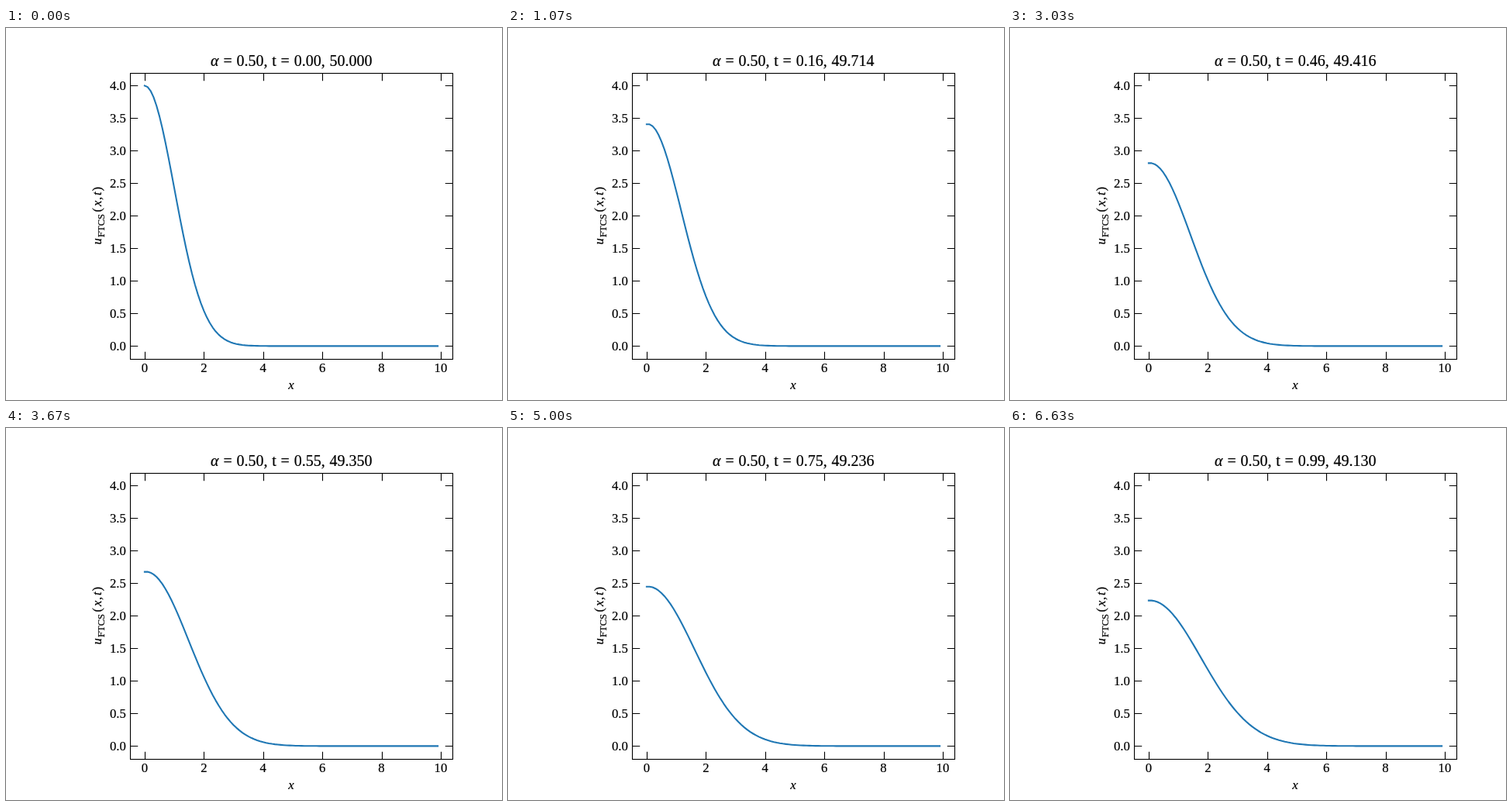
Animation, 640 px wide and 480 px high, one loop 6.66 s. Source, as an HTML page:

```html
<!DOCTYPE html>
<html lang="en">
<head>
<meta charset="utf-8">
<title>Heat equation, FTCS scheme</title>
<style>
  html, body { margin: 0; width: 100%; height: 100%; overflow: hidden; background: #fff; }
  svg { display: block; width: 640px; height: 480px; }
  text { font: 16.67px "Liberation Serif", "Times New Roman", serif; stroke: #000; stroke-width: .2px; }
  .title { font-size: 20px; word-spacing: .8px; }
  .var { font-style: italic; }
  .sub { font-size: 12.6px; }
  .frame { fill: none; stroke: #000; stroke-width: 1.11; }
  .curve { fill: none; stroke: #1f77b4; stroke-width: 2.083; stroke-linecap: square; stroke-linejoin: round; }
</style>
</head>
<body>
<svg viewBox="0 0 640 480">
  <path class="curve" id="curve"/>
  <path class="frame" id="ticks"/>
  <rect class="frame" x="160.5" y="58.5" width="416" height="369"/>
  <g id="labels"></g>
  <text class="title" x="368.3" y="48.7" text-anchor="middle"><tspan class="var">α</tspan> = 0.50, t = <tspan id="clock"></tspan>, <tspan id="total"></tspan></text>
  <text class="var" x="368" y="466" text-anchor="middle">x</text>
  <text transform="translate(123 242) rotate(-90)"><tspan class="var" x="-37.5">u</tspan><tspan class="sub" x="-28" y="3.5">FTCS</tspan><tspan x="4.5" y="0">(</tspan><tspan class="var" x="12">x</tspan><tspan x="20">,</tspan><tspan class="var" x="26">t</tspan><tspan x="31.5">)</tspan></text>
</svg>
<script>
const LOOP = 6660, STEPS = 200, POINTS = 100, DX = 0.1, DT = 0.005;
const LEFT = 160, RIGHT = 576, TOP = 57.6, BOTTOM = 427.2, TICK = 9.72;
const PEAK = 10 / Math.sqrt(2 * Math.PI);
const X_MAX = (POINTS - 1) * DX;
const $ = id => document.getElementById(id);

// Axes with a 5 % margin around the data
const px = x => LEFT + (RIGHT - LEFT) * (x / X_MAX + 0.05) / 1.1;
const py = u => BOTTOM - (BOTTOM - TOP) * (u / PEAK + 0.05) / 1.1;
const snap = v => Math.round(v) + 0.5;

function addLabel(x, y, anchor, content) {
  const label = document.createElementNS("http://www.w3.org/2000/svg", "text");
  label.setAttribute("x", x);
  label.setAttribute("y", y);
  label.setAttribute("text-anchor", anchor);
  label.textContent = content;
  $("labels").append(label);
}

function drawAxes() {
  let d = "";
  for (let x = 0; x <= 10; x += 2) {
    const c = snap(px(x));
    d += `M${c} 427.5v${-TICK}M${c} 58.5v${TICK}`;
    addLabel(px(x), 443.8, "middle", x);
  }
  for (let u = 0; u <= 4; u += 0.5) {
    const c = snap(py(u));
    d += `M160.5 ${c}h${TICK}M576.5 ${c}h${-TICK}`;
    addLabel(154.8, c + 5.3, "end", u.toFixed(1));
  }
  $("ticks").setAttribute("d", d);
}

// Explicit diffusion step with alpha = 1/2 and zero-slope ends
function advance(u) {
  const next = u.map((_, i) => (u[i - 1] + u[i + 1]) / 2);
  next[0] = next[1];
  next[POINTS - 1] = next[POINTS - 2];
  return next;
}

const states = [Array.from({ length: POINTS }, (_, i) => PEAK * Math.exp(-((i * DX) ** 2) / 2))];
while (states.length < STEPS) states.push(advance(states[states.length - 1]));

const trapezoid = u => u.reduce((a, b) => a + b) - (u[0] + u[POINTS - 1]) / 2;

// Exact ties round to the even digit
const clockText = k => (k * DT - (k % 100 === 25 ? 1e-9 : 0)).toFixed(2);

// Three steps per 100 ms, at 0, 30 and 70
function stepAt(ms) {
  const rest = ms % 100;
  return 3 * Math.floor(ms / 100) + (rest >= 30) + (rest >= 70);
}

let shown = -1;
function render(ms) {
  const k = stepAt(ms % LOOP);
  if (k === shown) return;
  shown = k;
  const u = states[k];
  $("curve").setAttribute("d", "M" + u.map((v, i) => px(i * DX).toFixed(2) + " " + py(v).toFixed(2)).join("L"));
  $("clock").textContent = clockText(k);
  $("total").textContent = trapezoid(u).toFixed(3);
}

drawAxes();
const start = performance.now();
function tick() {
  render(performance.now() - start);
  requestAnimationFrame(tick);
}
tick();
</script>
</body>
</html>
```
